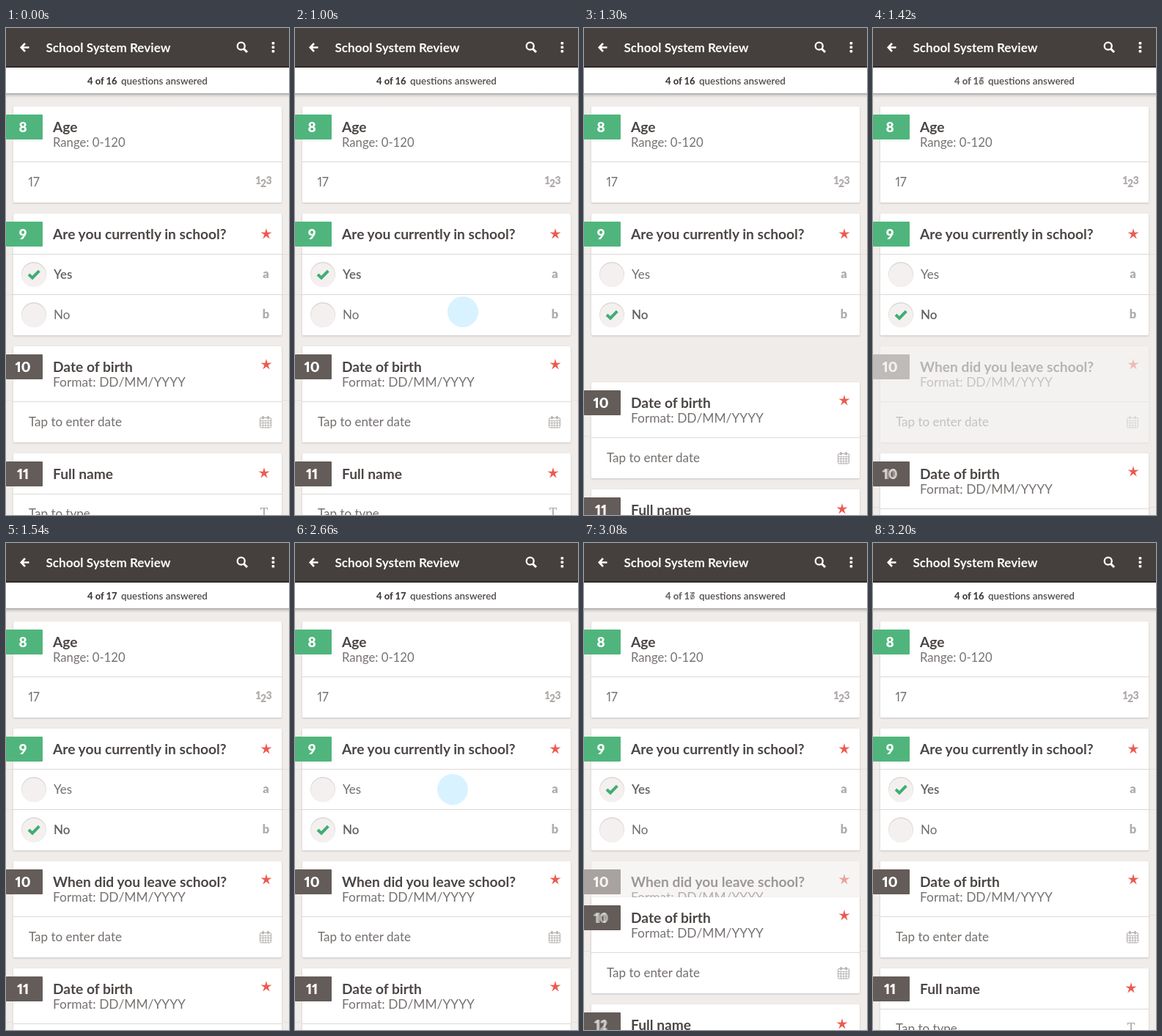
An HTML page for the animation above (3370 ms loop, 386 px wide and 664 px high).

```html
<!DOCTYPE html>
<html lang="en">
<head>
<meta charset="utf-8">
<title>School System Review</title>
<style>
html, body { margin: 0; width: 100%; height: 100%; overflow: hidden; background: #efecea; }
svg { display: block; width: 386px; height: 664px; font-family: Lato, "Open Sans", sans-serif; }
.paper { fill: #fff; filter: drop-shadow(0 1px 1.2px rgba(60, 50, 45, .22)); }
.rule { stroke: #dddad8; }
.faint { stroke: #e3dfdc; }
.bar { font-size: 17.1px; font-weight: 700; fill: #fff; }
.count { font-size: 13px; font-weight: 800; fill: #403b39; }
.note { font-size: 13.4px; font-weight: 600; fill: #504b49; }
.head { font-size: 19.2px; font-weight: 700; fill: #4b4644; }
.sub { font-size: 17.4px; fill: #777270; }
.range { font-size: 16.7px; }
.value { font-size: 17px; fill: #736e6b; }
.strong { font-weight: 600; fill: #65605d; }
.num { font-size: 19px; font-weight: 900; fill: #fff; text-anchor: middle; }
.num, .prop { font-variant-numeric: proportional-nums; }
.prop { font-size: 16.4px; }
.key { font-size: 16.5px; font-weight: 900; fill: #b0acaa; text-anchor: middle; }
.small { font-size: 14px; }
.star { fill: #eb5a4f; }
.check { fill: none; stroke: #3fae72; stroke-width: 4; }
</style>
</head>
<body>
<svg id="stage" viewBox="0 0 386 664"></svg>
<script>
const LOOP = 3370, STEP = 60, PITCH = 146;
const GREEN = '#50b57c', BROWN = '#635c59';

const text = (cls, x, y, s, id = '') =>
  `<text class="${cls}" x="${x}" y="${y}"${id && ` id="${id}"`}>${s}</text>`;
const rule = (y, cls = 'rule', a = 10, b = 376) =>
  `<path class="${cls}" d="M${a} ${y + .5}H${b}"/>`;
const margins = y => rule(y, 'faint', 0, 10) + rule(y, 'faint', 376, 386);

function star(x, y) {
  const pts = Array.from({ length: 10 }, (_, i) => {
    const r = i % 2 ? 2.7 : 8, a = (i / 5 - .5) * Math.PI;
    return `${(x + r * Math.cos(a)).toFixed(2)},${(y + r * Math.sin(a)).toFixed(2)}`;
  });
  return `<polygon class="star" points="${pts.join(' ')}"/>`;
}

// Everything inside a card is placed relative to its top edge.
function card({ id, y, h = 131, color = BROWN, nums, title, inner }) {
  const labels = nums.map((n, i) => text('num', 23, 35, n, nums[1] ? `${id}-n${i}` : '')).join('');
  return `<g id="${id}" transform="translate(0 ${y})">
    <rect class="paper" x="10" width="366" height="${h}" rx="1.5"/>
    <rect y="11" width="50" height="34" rx="1" fill="${color}"/>${labels}
    ${text('head', 64, 35, title)}${inner}</g>`;
}

const calendar = `<g transform="translate(346 95)" fill="none" stroke="#aeaaa8">
  <rect x=".5" y="2.5" width="15" height="13.5" rx="1.5"/>
  <path d="M1 6.5H15M1 9.5H15M1 12.8H15M4.5 6.5V16M8 6.5V16M11.5 6.5V16" stroke-width=".8"/>
  <path d="M4.5 0V4.5M11.5 0V4.5" stroke-width="2"/></g>`;

const dateInner = star(355, 25) + text('sub', 64, 55, 'Format: DD/MM/YYYY') +
  rule(75) + text('value', 31, 109, 'Tap to enter date') + calendar;

const option = (id, y, label, key) => `
  <circle cx="38" cy="${y}" r="17" fill="#dcd7d5"/>
  <circle cx="38" cy="${y + .9}" r="16.4" fill="#f4f0f0"/>
  ${text('value', 65, y + 6, label, id + '-off')}
  <g id="${id}-on">${text('value strong', 65, y + 6, label)}
    <path class="check" d="M31 ${y}L36 ${y + 4.7}L45.3 ${y - 4.8}"/></g>
  ${text('key', 354.5, y + 5, key)}`;

const age = card({
  id: 'age', y: 107, color: GREEN, nums: [8], title: 'Age',
  inner: text('sub range', 64, 55, 'Range: 0-120') + rule(75) + text('value prop', 30.5, 109, '17') +
    text('key small', 344, 106, '1') + text('key small', 351, 110, '2') + text('key small', 358.5, 106, '3')
});
const school = card({
  id: 'school', y: 253, h: 166, color: GREEN, nums: [9], title: 'Are you currently in school?',
  inner: star(355, 28) + rule(55) + rule(110) + option('yes', 83, 'Yes', 'a') + option('no', 138, 'No', 'b')
});
const left = card({ id: 'left', y: 434, nums: [10], title: 'When did you leave school?', inner: dateInner });
const birth = card({
  id: 'birth', y: 434, nums: [10, 11], title: 'Date of birth', inner: margins(73) + dateInner
});
const person = card({
  id: 'person', y: 580, nums: [11, 12], title: 'Full name',
  inner: star(352, 27) + rule(55) + text('value', 31, 88, 'Tap to type') +
    `<text x="352" y="87" font-family="Noto Serif, serif" font-size="18" text-anchor="middle" fill="#aeaaa8">T</text>`
});

const header = `
  <linearGradient id="shade" x2="0" y2="1">
    <stop stop-opacity=".32"/><stop offset=".4" stop-opacity=".12"/><stop offset="1" stop-opacity="0"/>
  </linearGradient>
  <rect y="89" width="386" height="6" fill="url(#shade)"/>
  <rect y="53" width="386" height="36" fill="#fff"/>
  <rect width="386" height="54" fill="#45403e"/>
  <rect y="52" width="386" height="2" fill="#2f2b29"/>
  <g fill="none" stroke="#fff">
    <path d="M31.5 26.5H21.5M26 21L20.8 26.5L26 32" stroke-width="2.6"/>
    <circle cx="320.7" cy="24.7" r="5" stroke-width="2.3"/>
    <path d="M324.3 28.4L329 33" stroke-width="3"/>
  </g>
  ${[20.8, 26.3, 31.8].map(y => `<rect x="362.6" y="${y - 1.8}" width="3.6" height="3.6" rx=".8" fill="#fff"/>`).join('')}
  ${text('bar', 54.5, 33, 'School System Review')}
  ${text('count', 111, 77, '4 of 16', 'total0')}${text('count', 111, 77, '4 of 17', 'total1')}
  ${text('note', 157, 77, 'questions answered')}`;

const stage = document.getElementById('stage');
stage.innerHTML = '<rect width="386" height="664" fill="#efecea"/>' +
  margins(308) + margins(363) + age + school + left + birth + person + header +
  '<circle id="tap" r="21" fill="#d9f2ff"/>';

const $ = id => document.getElementById(id);
const fade = (id, v) => $(id).setAttribute('opacity', v);
const move = (id, x, y) => $(id).setAttribute('transform', `translate(${x} ${y})`);
const clamp = (v, a, b) => Math.min(b, Math.max(a, v));
const ramp = (k, a, b) => clamp((k - a) / (b - a), 0, 1);

function poseAt(t) {
  const opening = t < 2660;
  const k = clamp(Math.floor((t - (opening ? 1000 : 2660)) / STEP), -1, 9);
  const tap = k < 0 ? 0 : 1 - ramp(k, 1, 5);
  const pick = ramp(k, 0, 3);
  return opening
    ? { tap, x: 229, y: 387, no: pick, shift: ramp(k, 4, 7), extra: ramp(k, 6, 9) }
    : { tap, x: 215, y: 336, no: 1 - pick, shift: 1 - ramp(k, 5, 8), extra: 1 - ramp(k, 5, 9) };
}

function draw(t) {
  const p = poseAt(t), dy = Math.round(p.shift * PITCH);
  move('tap', p.x, p.y);
  fade('tap', p.tap);
  fade('yes-on', 1 - p.no);
  fade('yes-off', p.no);
  fade('no-on', p.no);
  fade('no-off', 1 - p.no);
  move('birth', 0, 434 + dy);
  move('person', 0, 580 + dy);
  fade('left', p.extra);
  for (const id of ['total', 'birth-n', 'person-n']) {
    fade(id + 0, 1 - p.extra);
    fade(id + 1, p.extra);
  }
}

const start = performance.now();
function tick() {
  draw((performance.now() - start) % LOOP);
  requestAnimationFrame(tick);
}
tick();
</script>
</body>
</html>
```
